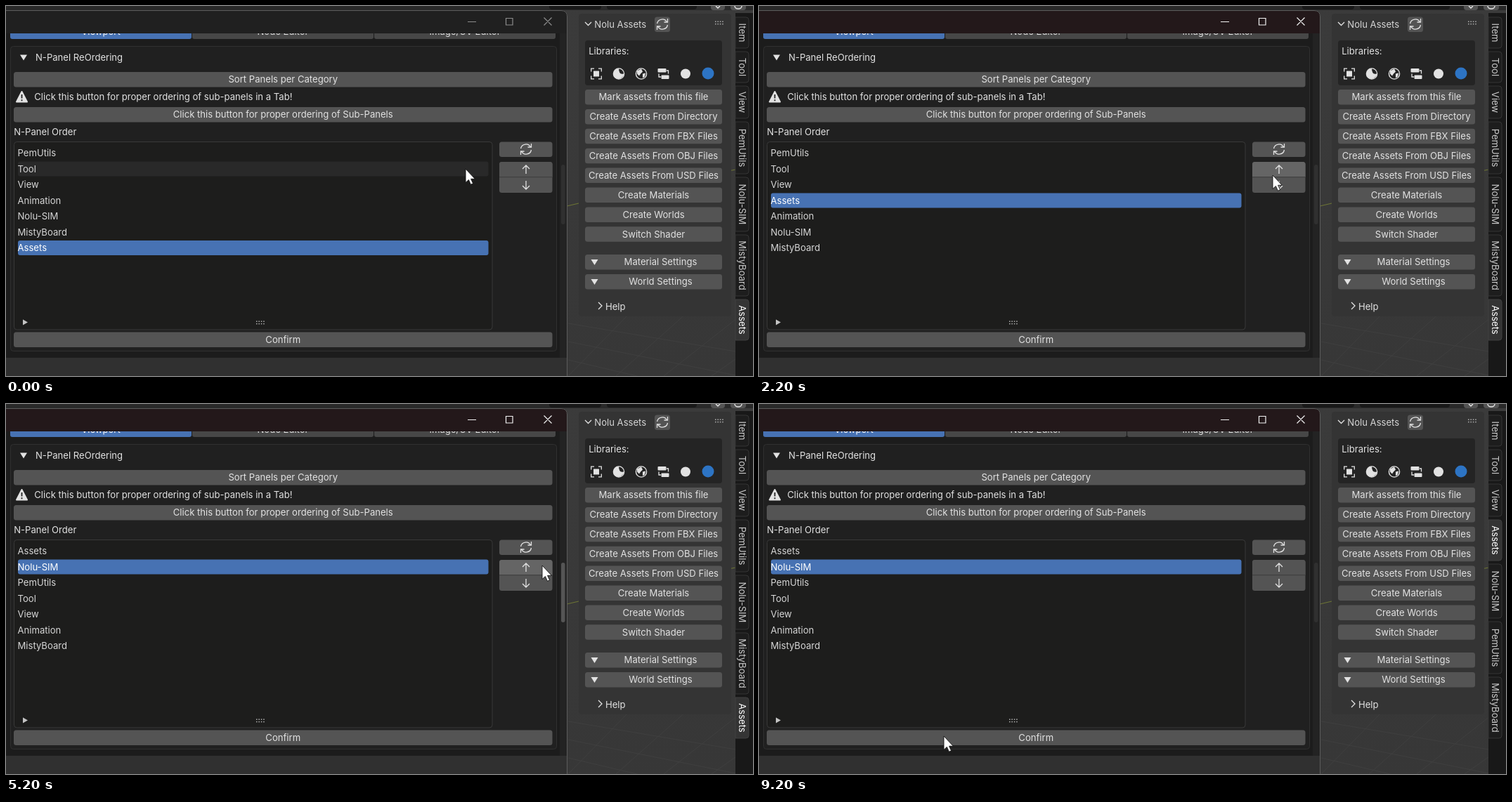
Write an HTML page that moves like this. It is 1063 by 527 pixels and loops after 9400 ms.

```html
<!DOCTYPE html>
<html lang="en">
<head>
<meta charset="utf-8">
<title>Panel reordering</title>
<style>
  html, body { margin: 0; width: 100%; height: 100%; overflow: hidden; background: #393939; }
  svg { display: block; font: 13.1px Inter, sans-serif; white-space: pre; }
</style>
</head>
<body>
<svg id="stage" width="1063" height="527" viewBox="0 0 1063 527"></svg>
<script>
const LOOP = 9400, STEP = 200;
const BLUE = '#4772b3', BUTTON = '#545454', HOVER = '#656565', TEXT = '#e2e2e2';
const UTILS = 'PemUtils', SIM = 'Nolu-SIM', BOARD = 'MistyBoard';

// Pointer path: time, x, y of the tip
const PATH = [
  [0, 654, 232], [200, 654, 232], [1200, 731, 241], [2800, 731, 241], [3600, 560, 315],
  [3900, 560, 315], [4400, 766, 225], [5200, 763, 230], [5400, 763, 230], [6000, 440, 470],
  [6400, 440, 470], [7200, 1050, 223], [7600, 1050, 223], [8400, 340, 457], [9000, 263, 473], [9400, 263, 473]
];

const rect = (x, y, w, h, fill, r = 0, extra = '') =>
  `<rect x="${x}" y="${y}" width="${w}" height="${h}" rx="${r}" fill="${fill}" ${extra}/>`;
const label = (s, x, y, anchor = 'start', fill = TEXT) =>
  `<text x="${x}" y="${y + 4.7}" text-anchor="${anchor}" fill="${fill}">${s}</text>`;
const line = (d, color = TEXT, width = 1.3) =>
  `<path d="${d}" fill="none" stroke="${color}" stroke-width="${width}"/>`;
const shape = (d, fill = TEXT, extra = '') => `<path d="${d}" fill="${fill}" ${extra}/>`;
const disc = (x, y, r, fill = TEXT) => `<circle cx="${x}" cy="${y}" r="${r}" fill="${fill}"/>`;
const ring = r => `<circle r="${r}" fill="none" stroke="${TEXT}" stroke-width="1.4"/>`;
const at = (x, y, content) => `<g transform="translate(${x} ${y})">${content}</g>`;
const button = (s, x, y, w, fill = BUTTON, textX = x + w / 2) =>
  rect(x, y, w, 21.5, fill, 3.5) + label(s, textX, y + 10.7, 'middle');
const downTriangle = (x, y) => shape(`M${x - 5} ${y - 3.5}h10l-5 8z`);
const refresh = (x, y) => at(x, y, line(
  'M-7.5 -1A7.5 7.5 0 0 1 6.5 -3M7.5 -8V-3H2.5M7.5 1A7.5 7.5 0 0 1 -6.5 3M-7.5 8V3H-2.5'));
const arrow = (x, y, dir) => at(x, y, line(`M0 ${6 * dir}V${-6 * dir}M-5 ${-dir}L0 ${-6 * dir}L5 ${-dir}`));
const grip = (x, y) => Array.from({ length: 8 }, (_, i) =>
  rect(x + (i % 4) * 3.4 - 6, y + (i >> 2) * 3.4 - 2.5, 1.5, 1.5, '#b0b0b0')).join('');

function pointerAt(t) {
  const i = PATH.findIndex(p => p[0] > t);
  const [t0, x0, y0] = PATH[i - 1], [t1, x1, y1] = PATH[i];
  const k = (t - t0) / (t1 - t0), ease = k * k * (3 - 2 * k);
  return { x: x0 + (x1 - x0) * ease, y: y0 + (y1 - y0) * ease };
}

// Each click on the up arrow lifts the chosen entry by one row
function listAt(t) {
  const items = [UTILS, 'Tool', 'View', 'Animation', SIM, BOARD];
  const lift = (start, from, to) =>
    Math.max(to, Math.min(from, from - 1 - Math.floor((t - start) / STEP)));
  const assetRow = lift(1800, 6, 0);
  items.splice(assetRow, 0, 'Assets');
  if (t < 3800) return { items, selected: assetRow };
  const simRow = lift(4600, 5, 1);
  items.splice(simRow, 0, items.splice(5, 1)[0]);
  return { items, selected: simRow };
}

function viewport() {
  let s = '<defs><linearGradient id="view" x2="0" y2="1"><stop stop-color="#3b3b3b"/>' +
    '<stop offset="1" stop-color="#373737"/></linearGradient></defs>' +
    rect(0, 0, 1063, 527, 'url(#view)');
  for (let i = 0; i < 4; i++)
    s += line(`M${800 + i * 68} 527L${895 + i * 82} 430M800 ${452 + i * 26}L1038 ${492 + i * 34}`, '#3f3f3f', 1);
  return s + line('M798 285L815 281M1028 235L1038 233', '#6c7434', 1.2) +
    rect(815, 11, 217, 431, '#343434', 4) +
    rect(0, 0, 1063, 6, '#292929') + rect(773, -12, 74, 17, '#181818', 4) +
    rect(855, -12, 128, 17, '#181818', 4) + rect(1003, -12, 20, 18, '#545454', 4) +
    rect(1031, -12, 22, 18, '#545454', 4) +
    line('M1010 0l3 3 3 -3M1037 0a5 4 0 0 0 10 0', TEXT, 1.5);
}

function libraryIcons() {
  return at(840, 96.5,
      rect(-4, -4, 8, 8, TEXT) + line('M-7.3 -3V-7.3H-3M3 -7.3H7.3V-3M7.3 3V7.3H3M-3 7.3H-7.3V3')) +
    at(872, 96.5, ring(7.6) + shape('M0 -7.6A7.6 7.6 0 0 0 0 7.6Q6 6 7.6 0Q0 2 0 -7.6')) +
    at(904, 96.5, ring(7.6) + shape('M-6 -4L0 -7L2 -3L-1 0L-3 3L-6 0ZM2 0L6 -1L5 4L2 6Z')) +
    at(935, 96.5, rect(-7.5, -7.5, 12, 5.5, TEXT, 1) + rect(-2.5, 2, 11, 5.5, TEXT, 1) +
      line('M5 -4.5H7.5V0M-6 0V4.5H-3')) +
    disc(967, 96.5, 7) + disc(999, 96, 8.5, '#2d74c4');
}

function sidePanel(over) {
  const actions = ['Mark assets from this file', 'Create Assets From Directory',
    'Create Assets From FBX Files', 'Create Assets From OBJ Files', 'Create Assets From USD Files',
    'Create Materials', 'Create Worlds', 'Switch Shader'];
  let s = line('M824 23l4.5 4.5 4.5 -4.5') + label('Nolu Assets', 837.3, 26, 'start', '#d5d5d5') +
    rect(923, 15.5, 22, 21.5, BUTTON, 3.5) + refresh(934, 26) + grip(1015, 24) +
    rect(824, 49, 195, 64, '#242424', 4) + label('Libraries:', 829.2, 64.3) + libraryIcons();
  const fill = y => over(824, y, 195) ? HOVER : BUTTON;
  actions.forEach((name, i) => { const y = 119 + i * 27.9; s += button(name, 824, y, 195, fill(y)); });
  ['Material Settings', 'World Settings'].forEach((name, i) => {
    const y = 354 + i * 27.9;
    s += button(name, 824, y, 195, fill(y), 931.5) + downTriangle(837.5, y + 10.5);
  });
  return s + line('M843 422l5 5 -5 5') + label('Help', 853, 428);
}

function tabs(reordered) {
  const sizes = { Item: 44, Tool: 44, View: 46, [UTILS]: 74, [SIM]: 77, [BOARD]: 87, Assets: 58 };
  const order = ['Item', 'Tool', 'View'].concat(
    reordered ? ['Assets', SIM, UTILS, BOARD] : [UTILS, SIM, BOARD, 'Assets']);
  let y = 16, s = rect(1038, 10, 25, 517, '#181818');
  for (const name of order) {
    const h = sizes[name], active = name === 'Assets';
    s += shape(`M1038 ${y}h15q4 0 4 4v${h - 8}q0 4 -4 4h-15z`, active ? '#343434' : '#1d1d1d',
      `stroke="${active ? '#404040' : '#353535'}"`) +
      `<g transform="translate(1048 ${y + h / 2}) rotate(90)">` +
      label(name, 0, 0, 'middle', active ? '#fff' : '#c8c8c8') + '</g>';
    y += h + 5;
  }
  return s;
}

function windowFrame(t, pointer) {
  const title = t < 1800 ? '#202020' : t < 2000 ? '#211a1b' : '#23181a';
  const ink = t < 1800 ? '#8c8c8c' : '#f2f2f2';
  let s = shape('M-2 6H790Q799 6 799 15V529H-2Z', '#1c1c1c') + rect(0, 501, 798, 26, '#303030') +
    rect(788, 39, 10, 462, '#232323') +
    rect(790, 226, 5.5, 85, pointer.x > 745 ? '#555' : '#303030', 2.7);
  ['Viewport', 'Node Editor', 'Image/UV Editor'].forEach((name, i) => {
    const x = 6 + i * 259;
    s += rect(x, 26, 258, 21, i ? '#474747' : BLUE, 3) + label(name, x + 129, 36.5, 'middle', i ? TEXT : '#fff');
  });
  return s + shape('M0 6.5H790Q798.5 6.5 798.5 15V39H0Z', title) +
    line('M657 22.5h12M711.5 17.5h9.5v9.5h-9.5zM765.5 16.5l11 11M776.5 16.5l-11 11', ink, 1.2) +
    line('M0 6.5H790Q798.5 6.5 798.5 15V527', '#5c5c5c', 1);
}

function reorderPanel(t, pointer, over) {
  const { items, selected } = listAt(t);
  const tone = (x, y, w) => over(x, y, w) ? HOVER : BUTTON;
  let s = rect(6.5, 57.5, 777, 434, '#202020', 4, 'stroke="#303030"') +
    downTriangle(25, 73) + label('N-Panel ReOrdering', 42, 73) +
    button('Sort Panels per Category', 11, 94, 766.5) +
    shape('M22.5 122L30 136.5H15Z', TEXT, 'stroke="#e2e2e2" stroke-width="2" stroke-linejoin="round"') +
    line('M22.5 126v5.5M22.5 133.2v2', '#202020', 1.8) +
    label('Click this button for proper ordering of sub-panels in a Tab!', 40.3, 129.5) +
    button('Click this button for proper ordering of Sub-Panels', 11, 144, 766.5) +
    label('N-Panel Order', 11.2, 179.3) +
    rect(11.5, 193.5, 680.5, 267.5, '#1d1d1c', 4, 'stroke="#393939"');

  items.forEach((name, i) => {
    const y = 199 + i * 22.5;
    if (i === selected) s += rect(17, y, 669.5, 21, BLUE, 3);
    else if (over(17, y, 669)) s += rect(17, y, 669.5, 21, '#292929', 3);
    s += label(name, 16.5, y + 10.7, 'start', i === selected ? '#fff' : '#d6d6d6');
  });
  s += shape('M24 446.5v8l7 -4z', '#c4c4c4') + grip(362, 451);

  const pressed = t === 1800;
  s += rect(702, 193.5, 75.5, 21.5, tone(702, 193, 75), 3.5) + refresh(740, 204) +
    rect(702, 222, 75.5, 44, BUTTON, 3.5) +
    shape('M702 243.5V225.5Q702 222 705.5 222H774Q777.5 222 777.5 225.5V243.5Z',
      pressed ? BLUE : tone(702, 222, 75)) +
    line('M702 243.7h75.5', '#3c3c3c', 1) + arrow(740, 233, 1) + arrow(740, 255, -1);
  return s + button('Confirm', 11, 464.5, 766.5, t === 6200 ? BLUE : BUTTON);
}

function draw(t) {
  const pointer = pointerAt(t);
  const over = (x, y, w) =>
    pointer.x >= x && pointer.x <= x + w && pointer.y >= y && pointer.y <= y + 21.5;
  document.getElementById('stage').innerHTML =
    viewport() + sidePanel(over) + tabs(t >= 6400) +
    windowFrame(t, pointer) + reorderPanel(t, pointer, over) +
    at(pointer.x, pointer.y, shape('M0 0V19.5L4.4 15.5L7.4 22.3L10.6 20.8L7.6 14.3H13.4Z', '#fff',
      'stroke="#111" stroke-width=".9"'));
}

let shown = -1;
function tick() {
  const t = Math.floor(performance.now() % LOOP / STEP) * STEP;
  if (t !== shown) draw(shown = t);
  requestAnimationFrame(tick);
}
tick();
</script>
</body>
</html>
```
